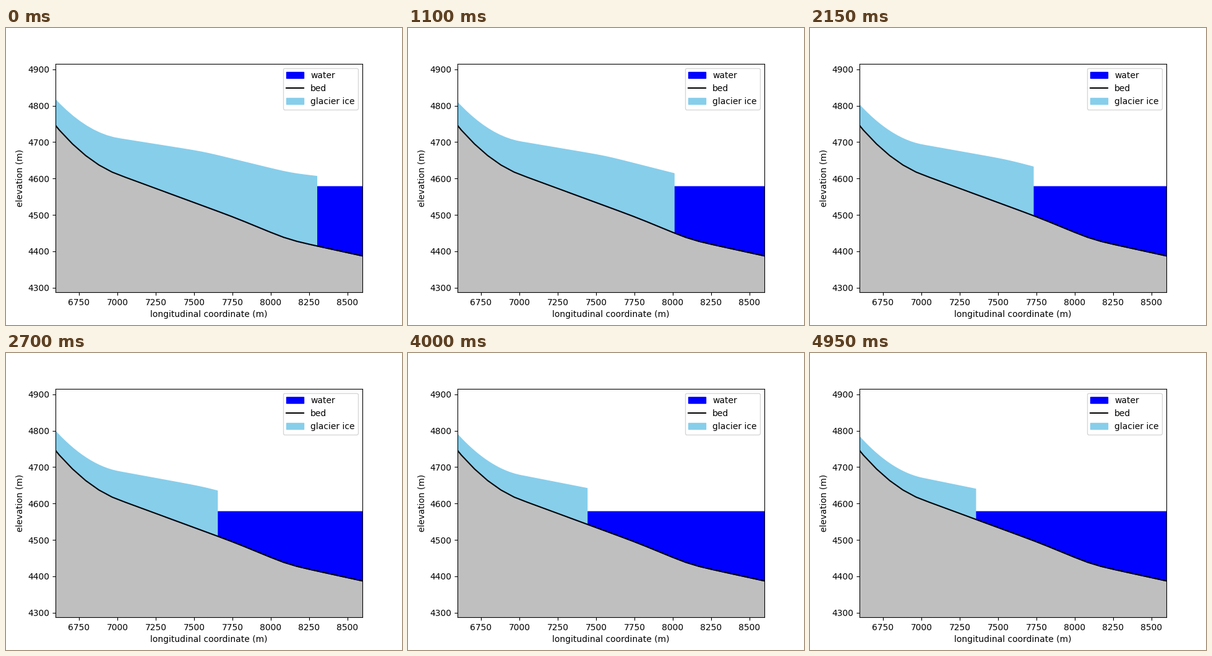
These frames come from a looping animation (640x480 px, 5450 ms). A matplotlib script:

```python
import numpy as np
import matplotlib.pyplot as plt
from matplotlib.animation import FuncAnimation

STEPS = 100       # moving frames
HOLD = 9          # extra frames resting on the last state
X_MIN, X_MAX = 6597, 8597
LAKE = 4578.7

# Calving front: (time step, position in m)
FRONT = [(0, 8298), (15, 8334), (23, 7960), (31, 7812),
         (54, 7650), (70, 7495), (80, 7440), (99, 7352)]


def bend(x, start, width=40):
    """Smooth ramp: 0 before start, slope 1 after it."""
    return width * np.logaddexp(0, (x - start) / width)


def head(x):
    """Steepening towards the upper end of the valley."""
    return np.maximum(7009 - x, 0) ** 2


def bed(x):
    return (4604 - 0.155 * (x - 7049) + 0.00042 * head(x)
            - 0.02 * bend(x, 7770) + 0.083 * bend(x, 8115))


def surface(x, t):
    start = (4706 - 0.067 * (x - 7077) + 0.00046 * head(x)
             - 0.036 * bend(x, 7560) + 0.055 * bend(x, 8130))
    thinning = 0.33 + 0.00019 * (x - X_MIN)
    return start - thinning * t


def ice_outline(t):
    front = np.interp(t, *zip(*FRONT))
    x = np.linspace(X_MIN - 20, front, 40)
    top = np.column_stack([x, surface(x, t)])
    bottom = np.column_stack([x, bed(x)])
    return np.concatenate([top, bottom[::-1]])


fig, ax = plt.subplots(figsize=(6.4, 4.8), dpi=100)
x = np.arange(X_MIN - 61, X_MAX + 90, 86)
lake_x = x[x > 7250]

ax.fill_between(x, 4200, bed(x), color="#bfbfbf")
ax.fill_between(lake_x, bed(lake_x), LAKE, color="blue", label="water")
ax.plot(x, bed(x), color="black", label="bed")
ice = ax.fill_between(x, bed(x), bed(x), color="skyblue", label="glacier ice")

ax.set_xlim(X_MIN, X_MAX)
ax.set_ylim(4287.4, 4915.6)
ax.set_xlabel("longitudinal coordinate (m)")
ax.set_ylabel("elevation (m)")
ax.legend(loc="upper right")


def update(i):
    ice.set_verts([ice_outline(min(i, STEPS - 1))])
    return (ice,)


anim = FuncAnimation(fig, update, frames=STEPS + HOLD, interval=50,
                     repeat=True, repeat_delay=0)
plt.show()
```
